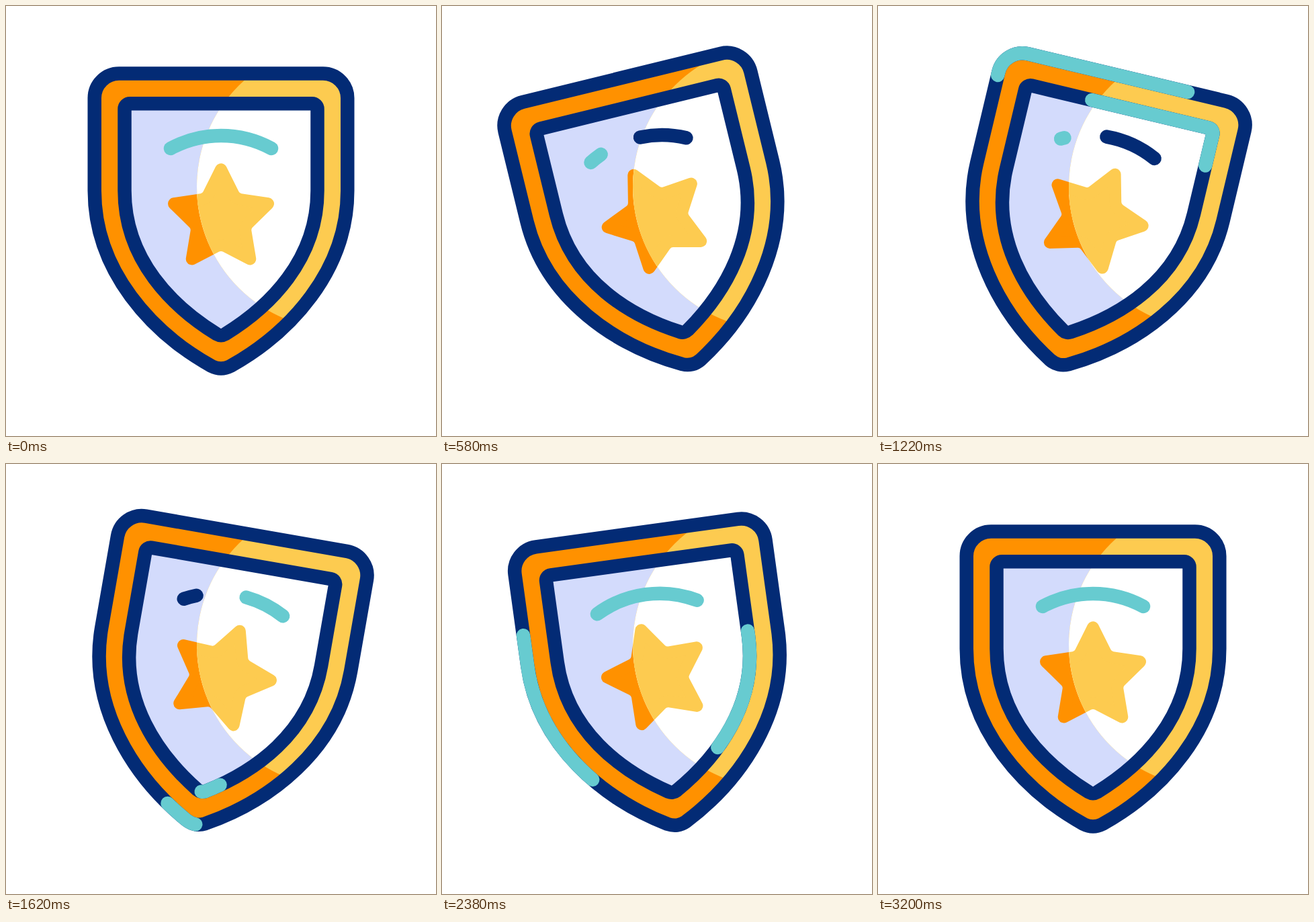
Write an HTML page that moves like this. It is 640x640 px and loops after 3.6 s.

```html
<!DOCTYPE html>
<html lang="en">
<head>
<meta charset="utf-8">
<title>Shield</title>
<style>
  html, body { margin: 0; width: 100%; height: 100%; overflow: hidden; background: #fff; }
  svg { display: block; width: 100vw; height: 100vh; }
  .line { fill: none; stroke-width: 20.5; stroke-linecap: round; stroke-linejoin: round; }
  .star { stroke-width: 18; stroke-linejoin: round; }
</style>
</head>
<body>
<svg id="stage" viewBox="0 0 640 640">
  <defs><clipPath id="light"><circle cx="497" cy="269" r="213"/></clipPath></defs>
</svg>
<script>
const LOOP = 3600;
const NAVY = '#032b75', TEAL = '#67cbd0', ORANGE = '#ff9100', YELLOW = '#fdcb50', LILAC = '#d3dbfc';
const stage = document.getElementById('stage');

function add(parent, tag, attrs = {}) {
  const node = document.createElementNS('http://www.w3.org/2000/svg', tag);
  for (const name in attrs) node.setAttribute(name, attrs[name]);
  return parent.appendChild(node);
}

// Closed outline that starts at the bottom tip; dir 1 climbs the right side, -1 the left.
function shieldPath(dir, s) {
  const x = dx => 320 + dir * dx;
  const sweep = dir > 0 ? 0 : 1;
  const [cx, cy] = s.bend;
  const corner = (dx, y) => `A${s.r} ${s.r} 0 0 ${sweep} ${x(dx)} ${y}`;
  return `M320 ${s.tip} Q${x(s.foot / 2)} ${s.tip} ${x(s.foot)} ${s.footY}
    C${x(cx)} ${cy} ${x(s.w)} ${s.sideY} ${x(s.w)} 275 V${s.top + s.r} ${corner(s.w - s.r, s.top)}
    H${x(s.r - s.w)} ${corner(-s.w, s.top + s.r)} V275
    C${x(-s.w)} ${s.sideY} ${x(-cx)} ${cy} ${x(-s.foot)} ${s.footY}
    Q${x(-s.foot / 2)} ${s.tip} 320 ${s.tip}Z`;
}

function starPath(cx, cy, tipR, notchR, cut) {
  const at = (r, i) => [cx + r * Math.sin(i * Math.PI / 5), cy - r * Math.cos(i * Math.PI / 5)];
  let d = '';
  for (let i = 0; i < 10; i += 2) {
    const tip = at(tipR, i), notch = at(notchR, i + 1), next = at(tipR, i + 2);
    const k = cut / Math.hypot(tip[0] - notch[0], tip[1] - notch[1]);
    const near = p => p.map((v, j) => notch[j] + (v - notch[j]) * k);
    d += `${i ? 'L' : 'M'}${tip} L${near(tip)} Q${notch} ${near(next)} `;
  }
  return d + 'Z';
}

const OUTER = shieldPath(1, { w: 188.25, top: 100.5, r: 36.5, sideY: 395, bend: [102, 487], foot: 14, footY: 536, tip: 539.6 });
const INNER = shieldPath(-1, { w: 143.5, top: 145.25, r: 8, sideY: 378, bend: [72, 448], foot: 6, footY: 488.5, tip: 490.25 });
const STAR = starPath(320, 317, 73.6, 37.1, 7.5);
const ARC = 'M245 212 A157.5 157.5 0 0 1 395 212';

const bodies = [], stars = [];
function body(parent) {
  const g = add(parent, 'g');
  bodies.push(g);
  return g;
}

function fills(parent, band, field) {
  const g = body(parent);
  add(g, 'path', { d: OUTER, fill: band });
  add(g, 'path', { d: INNER, fill: field });
  stars.push(add(g, 'path', { d: STAR, fill: band, stroke: band, class: 'star' }));
}

fills(stage, ORANGE, LILAC);
fills(add(stage, 'g', { 'clip-path': 'url(#light)' }), YELLOW, '#fff');
const lines = body(stage);
for (const d of [OUTER, INNER]) add(lines, 'path', { d, stroke: NAVY, class: 'line' });

// Each dash grows from head time and is eaten from tail time, both over `span`.
const dashes = [];
function dash(d, stroke, head, tail, span) {
  dashes.push({ node: add(lines, 'path', { d, stroke, class: 'line', pathLength: 1 }), head, tail, span });
}
for (const [head, tail] of [[655, 795], [1633, 1773]]) {
  dash(OUTER, TEAL, head, tail, 936);
  dash(INNER, TEAL, head - 17, tail - 17, 936);
}
const arcTimes = [[-500, 0], [158, 337], [478, 657], [820, 1006], [1168, 1355], [1518, 1698], [1878, LOOP]];
arcTimes.forEach(([head, tail], i) => dash(ARC, i % 2 ? NAVY : TEAL, head, tail, 467));

// Swing keys: time, angle, then the ease handles used to reach it.
const SWING = [
  [0, 0], [540, -13.8, .6, .4], [1340, 14, .77, .34], [2170, -12, .6, .49],
  [2667, 9.1, .76, .4], [3000, -1.1, .6, .4], [3200, 0, .5, .5]
];
const LAG = 67;
const STAR_SWING = SWING.map(([t, ...rest]) => [Math.min(t + LAG, 3200), ...rest]);

const clamp = v => Math.min(1, Math.max(0, v));
const smooth = v => v * v * (3 - 2 * v);

function ease(x, a, b) {
  let lo = 0, hi = 1;
  for (let i = 0; i < 24; i++) {
    const t = (lo + hi) / 2, u = 1 - t;
    if (3 * a * t * u * u + 3 * b * t * t * u + t * t * t < x) lo = t; else hi = t;
  }
  return smooth((lo + hi) / 2);
}

function angleAt(keys, t) {
  if (t <= keys[0][0]) return keys[0][1];
  for (let i = 1; i < keys.length; i++) {
    const [t0, v0] = keys[i - 1], [t1, v1, a, b] = keys[i];
    if (t < t1) return v0 + (v1 - v0) * ease((t - t0) / (t1 - t0), a, b);
  }
  return 0;
}

function draw(t) {
  const turn = angleAt(SWING, t), spin = angleAt(STAR_SWING, t);
  for (const g of bodies) g.setAttribute('transform', `rotate(${turn} 320 320)`);
  for (const s of stars) s.setAttribute('transform', `rotate(${spin} 320 317)`);
  for (const { node, head, tail, span } of dashes) {
    const from = smooth(clamp((t - tail) / span)), to = smooth(clamp((t - head) / span));
    const shown = to - from > 0.001;
    node.setAttribute('visibility', shown ? 'visible' : 'hidden');
    if (!shown) continue;
    node.setAttribute('stroke-dasharray', `${to - from} 3`);
    node.setAttribute('stroke-dashoffset', -from);
  }
}

const start = performance.now();
function tick() {
  draw((performance.now() - start) % LOOP);
  requestAnimationFrame(tick);
}
tick();
</script>
</body>
</html>
```
